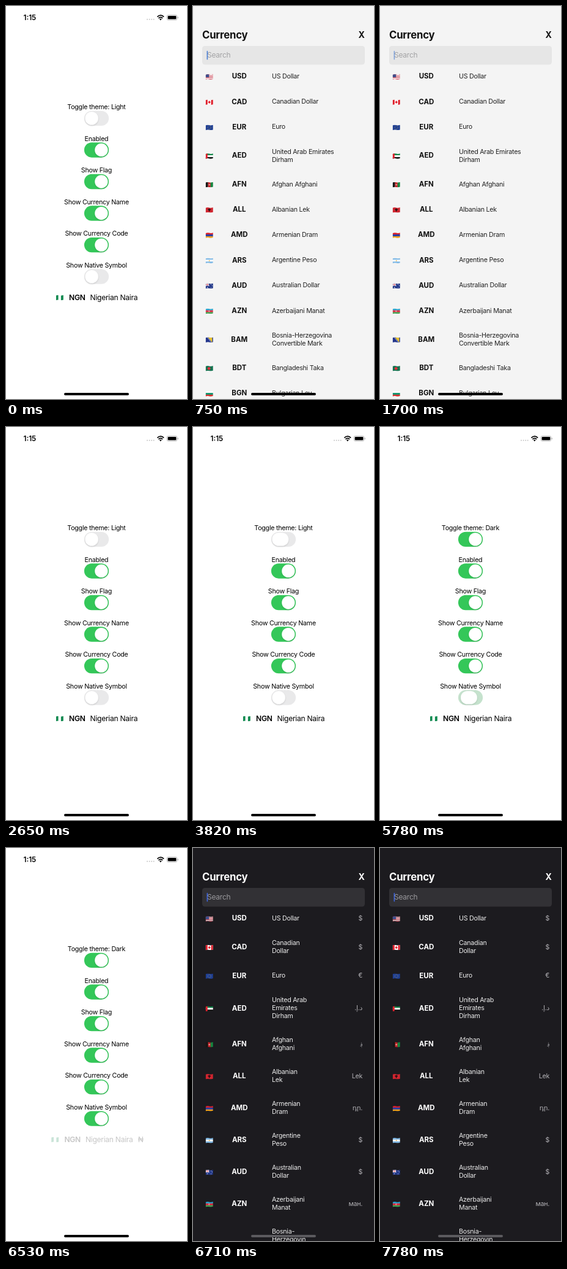
An HTML page that plays this animation: 296x640 px, repeating every 8 s.

```html
<!DOCTYPE html>
<html lang="en">
<head>
<meta charset="utf-8">
<title>Currency picker</title>
<style>
  html, body { margin: 0; width: 100%; height: 100%; overflow: hidden; background: #fff; }
  svg { display: block; width: 296px; height: 640px; }
  text { font-family: Inter, "Noto Sans", "DejaVu Sans", sans-serif; font-size: 10.7px; letter-spacing: -.024em; }
  .mid { text-anchor: middle; }
  .end { text-anchor: end; }
  .time { font-size: 11.7px; font-weight: 600; letter-spacing: 0; }
  .row { font-size: 12.1px; }
  .bold { font-weight: 600; }
  .title { font-size: 16.8px; font-weight: 700; letter-spacing: -.015em; }
  .close { font-size: 14px; font-weight: 700; }
  .code { font-size: 11.5px; font-weight: 700; letter-spacing: 0; }
</style>
</head>
<body>
<svg id="stage" viewBox="0 0 296 640" xmlns="http://www.w3.org/2000/svg"></svg>
<script>
const LOOP = 8000;
const stage = document.getElementById('stage');
const $ = id => document.getElementById(id);

const rect = (x, y, w, h, fill, r = 0) =>
  `<rect x="${x}" y="${y}" width="${w}" height="${h}" rx="${r}" fill="${fill}"/>`;
const dot = (x, y, r, fill) => `<circle cx="${x}" cy="${y}" r="${r}" fill="${fill}"/>`;
const text = (x, y, str, cls = '', fill = '#000', id = '') =>
  `<text x="${x}" y="${y}" class="${cls}" fill="${fill}" id="${id}">${str}</text>`;

// Flags live in a 12.6 x 9 box and share one waving outline.
const FW = 12.6, FH = 9;
const rows = (...c) => c.map((f, i) => rect(0, i * FH / c.length, FW, FH / c.length + .1, f)).join('');
const cols = (...c) => c.map((f, i) => rect(i * FW / c.length, 0, FW / c.length + .1, FH, f)).join('');
const line = (d, stroke, w) => `<path d="${d}" stroke="${stroke}" stroke-width="${w}" fill="none"/>`;

const flags = {
  USD: rows('#c8384a', '#fff', '#c8384a', '#fff', '#c8384a', '#fff', '#c8384a') + rect(0, 0, 5.8, 5, '#3f4f8c'),
  CAD: rect(0, 0, FW, FH, '#fff') + rect(0, 0, 3.4, FH, '#e0202c') + rect(9.2, 0, 3.4, FH, '#e0202c') +
    '<path d="M6.3 1.8L8.4 4.6 6.3 6.9 4.2 4.6Z" fill="#e0202c"/>',
  EUR: rect(0, 0, FW, FH, '#1f3f94') +
    '<circle cx="6.3" cy="4.5" r="2.6" fill="none" stroke="#b9a850" stroke-width=".7" stroke-dasharray=".6 .76"/>',
  AED: rows('#0f8748', '#fff', '#1a1a1a') + rect(0, 0, 3.4, FH, '#e0202c'),
  AFN: cols('#161616', '#c42127', '#14863f') + dot(6.3, 4.5, 1.3, '#dd9a92'),
  ALL: rect(0, 0, FW, FH, '#d0252f') + '<path d="M6.3 1.8L9 3.4 7.6 5 6.3 7.4 5 5 3.6 3.4Z" fill="#321014"/>',
  AMD: rows('#d9202c', '#2c3fa6', '#efa21f'),
  ARS: rows('#7fb9e6', '#fff', '#7fb9e6') + dot(6.3, 4.5, 1, '#e5b45a'),
  AUD: rect(0, 0, FW, FH, '#23398a') + line('M0 0L6 4.6M6 0L0 4.6M3 0V4.6M0 2.3H6', '#fff', 1.1) +
    line('M3 0V4.6M0 2.3H6', '#d03040', .6) + dot(3.1, 6.8, .7, '#fff') + dot(9.3, 2, .5, '#fff') +
    dot(9.3, 7, .5, '#fff') + dot(10.9, 3.8, .5, '#fff'),
  AZN: rows('#2ba6cf', '#dc2a40', '#41a450') + dot(6.1, 4.5, 1.1, '#fff') + dot(6.5, 4.5, .8, '#dc2a40'),
  BAM: rect(0, 0, FW, FH, '#23358c') + '<path d="M4 0H11V9Z" fill="#efc72e"/>' + line('M2.8 0L9.8 9', '#fff', .6),
  BDT: rect(0, 0, FW, FH, '#12724f') + dot(5.8, 4.5, 2.4, '#e0303c'),
  BGN: rows('#fff', '#1a9670', '#d3302c'),
  NGN: cols('#128a50', '#fff', '#128a50')
};
const flag = (code, x, y) =>
  `<g transform="translate(${x - FW / 2} ${y - FH / 2})" clip-path="url(#wave)">${flags[code]}</g>`;

// "/" always breaks, "|" and "^" break only in the narrow column.
const list = [
  ['USD', 'US Dollar', '$'], ['CAD', 'Canadian|Dollar', '$'], ['EUR', 'Euro', '€'],
  ['AED', 'United Arab|Emirates/Dirham', 'د.إ.\u200f'], ['AFN', 'Afghan|Afghani', '؋'],
  ['ALL', 'Albanian|Lek', 'Lek'], ['AMD', 'Armenian|Dram', 'դր.'], ['ARS', 'Argentine|Peso', '$'],
  ['AUD', 'Australian|Dollar', '$'], ['AZN', 'Azerbaijani|Manat', 'ман.'],
  ['BAM', 'Bosnia-^Herzegovin^a/Convertible|Mark', 'KM'],
  ['BDT', 'Bangladeshi|Taka', '৳'], ['BGN', 'Bulgarian|Lev', 'лв.']
];

const themes = {
  light: { bg: '#f4f4f4', box: '#e6e6e6', ink: '#111', name: '#222', hint: '#a3a3a5', caret: '#4a7fd6', bar: '#000' },
  dark: { bg: '#1c1b1f', box: '#323135', ink: '#fff', name: '#ececec', hint: '#98979b', caret: '#3f66e0', bar: '#5b5a5e' }
};

function picker(id) {
  const c = themes[id], dark = id === 'dark';
  let out = rect(0, 0, 296, 640, c.bg) + text(15, 52.6, 'Currency', 'title', c.ink) +
    text(275.6, 52.1, 'X', 'close mid', c.ink, id + 'Close') +
    rect(15, 65, 266, 30.5, c.box, 4.5) + text(23, 84.4, 'Search', 'row', c.hint) +
    `<g id="${id}Caret">${rect(22.6, 73, 1.6, 14.6, c.caret, .8)}</g>`;
  let top = 93.5;
  for (const [code, label, symbol] of list) {
    const lines = (dark ? label.replace(/[|^]/g, '/') : label.replace(/\|/g, ' ').replace(/\^/g, '')).split('/');
    const h = Math.max(41.2, 13 * lines.length + 26), y = top + h / 2;
    if (top > 640) break;
    out += flag(code, 26.7, y + 1.4) + text(75.8, y + 4.2, code, 'code mid', c.ink);
    lines.forEach((s, i) => out += text(129, y + 3.9 + 13 * (i - (lines.length - 1) / 2), s, '', c.name));
    if (dark) out += text(277, y + 3.9, symbol, 'end', '#b4b3b7');
    top += h;
  }
  return `<g id="${id}">${out}${rect(95, 630, 106, 4, c.bar, 2)}</g>`;
}

const statusBar = text(28.5, 23.2, '1:15', 'time') +
  [231, 234.6, 238.2, 241.6].map(x => dot(x, 21.8, .95, '#c4c4c4')).join('') +
  line('M247.4 17.6Q252.8 12.8 258.2 17.6', '#000', 1.7) +
  line('M249.4 19.9Q252.8 16.9 256.2 19.9', '#000', 1.6) +
  '<path d="M250.9 21.3Q252.8 19.7 254.7 21.3L252.8 23.4Z"/>' +
  '<rect x="263.2" y="14.6" width="16.6" height="8.4" rx="2.5" fill="none" stroke="#aaa" stroke-width=".8"/>' +
  rect(264.6, 16, 13.8, 5.6, '#000', 1.4) + rect(280.6, 17.4, 1.2, 2.8, '#aaa', .6);

const labels = ['Toggle theme: Light', 'Enabled', 'Show Flag', 'Show Currency Name', 'Show Currency Code', 'Show Native Symbol'];
const switches = labels.map((s, i) => {
  const y = 168 + i * 51.55;
  return text(148, y, s, 'mid', '#000', 'label' + i) +
    `<g transform="translate(127.9 ${y + 2.7})"><rect id="track${i}" width="40.2" height="24.4" rx="12.2"/>` +
    `<rect id="knob${i}" y="1.55" height="21.3" rx="10.65" fill="#fff" filter="url(#shade)"/></g>`;
}).join('');

stage.innerHTML = `<defs>
  <clipPath id="wave"><path d="M.3 1Q3.2 -.4 6.3 .6T12.3 .2V8Q9.4 9.2 6.3 8.4T.3 8.8Z"/></clipPath>
  <filter id="shade" x="-30%" y="-30%" width="160%" height="170%">
    <feDropShadow dx="0" dy="1.2" stdDeviation="1.1" flood-opacity=".16"/></filter>
</defs>
${rect(0, 0, 296, 640, '#fff')}${statusBar}${switches}
<g id="choice">${flag('NGN', 87.8, 475)}${text(103, 479.3, 'NGN', 'row bold')}
${text(137.6, 479.3, 'Nigerian Naira', 'row')}<g id="naira">${text(223.4, 479.3, '₦', 'row')}</g></g>
${rect(95, 630, 106, 4, '#000', 2)}${picker('light')}${picker('dark')}`;

// Held values: [start time, value]
const caret = [[0, 1], [1060, .7], [1180, .3], [1300, 0], [1470, .2], [1580, .45], [1700, .65], [1950, 1],
  [2210, .5], [2330, 0], [2530, 0], [6710, 1], [7150, .5], [7270, 0], [7590, .6], [7780, 1]];
const lightFade = [[0, 0], [620, .55], [750, 1], [2530, .5], [2650, 0]];
const closeFade = [[0, 1], [2210, .5], [2330, .22], [2530, 1]];
const pressFade = [[0, 1], [500, .22], [750, 1], [6530, .22], [6710, 1]];
const held = (table, t) => table.reduce((v, [start, next]) => t >= start ? next : v, 0);

// Switch press: [knob stretch, knob travel, green amount]
const flip = [[0, 0, 0], [.6, 0, 0], [1, 0, 0], [1, .25, .2], [1, .7, .65], [1, .95, .92], [.6, 1, 1], [.2, 1, 1], [0, 1, 1]];
const flipStep = (t, start, end, first) => t < start ? 0 :
  Math.min(8, first + Math.floor((t - start) / (end - start) * (8 - first) + 1e-6));

function setSwitch(i, [stretch, travel, green]) {
  const w = 21.3 + 5.5 * stretch;
  const mix = (a, b) => Math.round(a + (b - a) * green);
  $('knob' + i).setAttribute('width', w);
  $('knob' + i).setAttribute('x', 1.55 + (37.1 - w) * travel);
  $('track' + i).setAttribute('fill', `rgb(${mix(233, 52)},${mix(233, 199)},${mix(234, 89)})`);
}

function draw(t) {
  const theme = flipStep(t, 3710, 4460, 1), native = flipStep(t, 5670, 6320, 2);
  setSwitch(0, flip[theme]);
  setSwitch(5, flip[native]);
  $('label0').textContent = 'Toggle theme: ' + (theme >= 4 ? 'Dark' : 'Light');
  const symbol = native >= 4;
  $('naira').style.display = symbol ? '' : 'none';
  $('choice').setAttribute('transform', `translate(${symbol ? -7.6 : 0} 0)`);
  $('choice').setAttribute('opacity', held(pressFade, t));
  $('light').setAttribute('opacity', held(lightFade, t));
  $('dark').setAttribute('opacity', t >= 6710 ? 1 : 0);
  $('lightClose').setAttribute('opacity', held(closeFade, t));
  for (const id in themes) $(id + 'Caret').setAttribute('opacity', held(caret, t));
}

for (let i = 1; i < 5; i++) setSwitch(i, flip[8]);
const begin = performance.now();
function tick() {
  draw((performance.now() - begin) % LOOP);
  requestAnimationFrame(tick);
}
tick();
</script>
</body>
</html>
```
